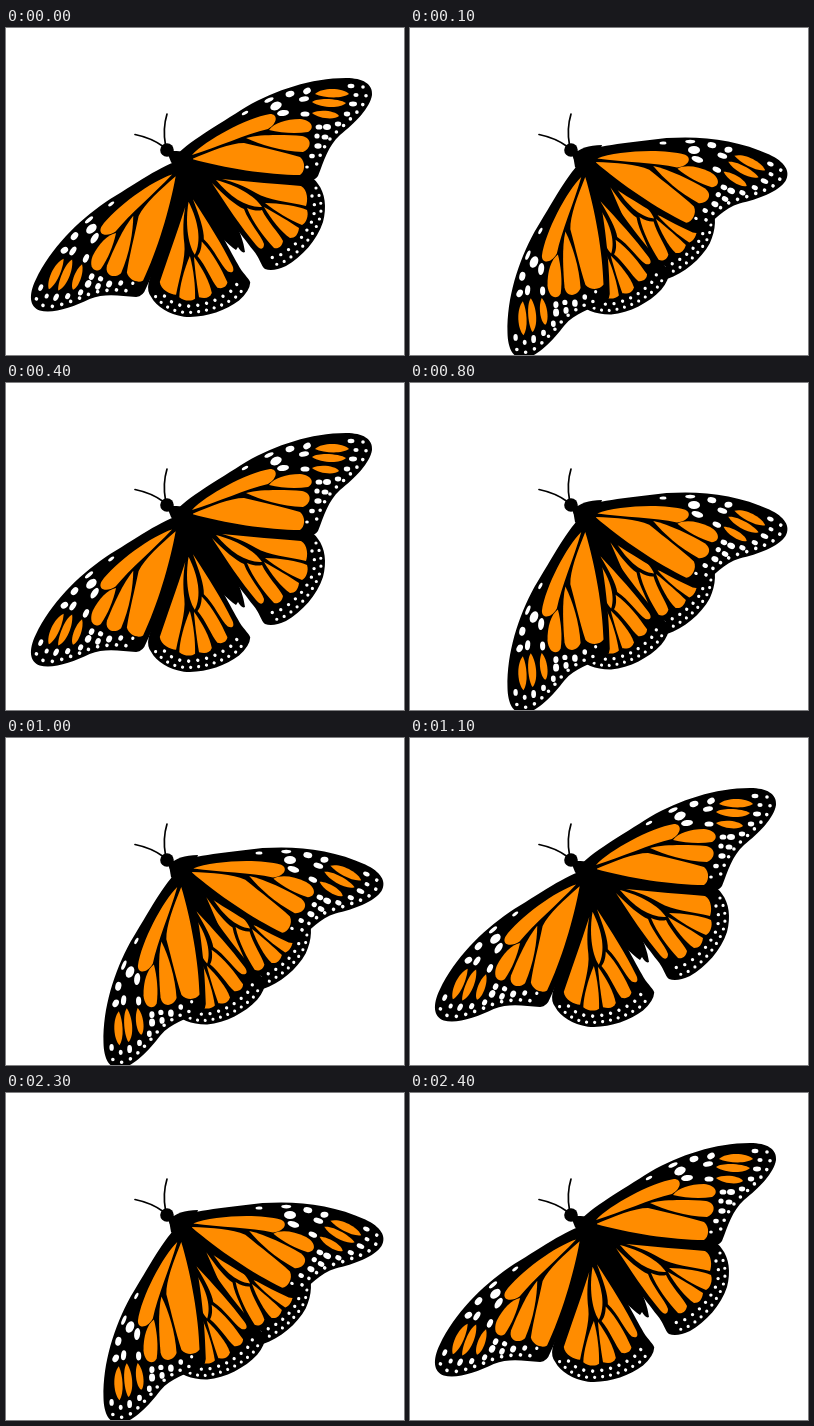
An HTML page that plays this animation: 398 by 327 pixels, repeating every 2.9 s.

```html
<!DOCTYPE html>
<html lang="en">
<head>
<meta charset="utf-8">
<title>Butterfly</title>
<style>
  html, body { margin: 0; width: 100%; height: 100%; overflow: hidden; background: #fff; }
  svg { display: block; width: 100vw; height: 100vh; }
  .cell { fill: #ff8c00; }
  .spot { fill: #fff; }
  .dots { fill: none; stroke: #fff; stroke-linecap: round; }
  .feeler { fill: none; stroke: #000; stroke-width: 1.7; stroke-linecap: round; }

  .pose { opacity: 0; animation: 2900ms step-end infinite; }
  .open { animation-name: open; }
  .half { animation-name: half; }
  .shut { animation-name: shut; }

  /* open, half, shut, half, open (rest), half, shut, half, open, half, shut (rest), half, open */
  @keyframes open {
    0%, 13.793%, 37.931%, 82.758%, 100% { opacity: 1; }
    3.448%, 27.586%, 41.379% { opacity: 0; }
  }
  @keyframes half {
    0%, 6.896%, 13.793%, 31.034%, 37.931%, 44.827%, 82.758%, 100% { opacity: 0; }
    3.448%, 10.344%, 27.586%, 34.482%, 41.379%, 79.31% { opacity: 1; }
  }
  @keyframes shut {
    0%, 10.344%, 34.482%, 79.31%, 100% { opacity: 0; }
    6.896%, 31.034%, 44.827% { opacity: 1; }
  }
</style>
</head>
<body>
<svg viewBox="0 0 398 327" preserveAspectRatio="none">
  <defs>
    <!-- wings: root at the origin, tip of the forewing along +x -->
    <g id="fore" transform="rotate(20.7) translate(-174 -130)">
      <path d="M169 129 C180 115 212 97 240 79 C270 62 305 50 340 50 C357 50 367 56 366 67 C364 80 349 95 334 107 C322 118 318 133 312 148 Q308 154 300 153 C260 153 220 148 196 143 L174 138 Z"/>
      <g class="cell">
        <path d="M186 127 C200 112 240 90 264 86 C272 86 272 95 262 101 C240 106 212 119 186 127 Z"/>
        <path d="M263 102 C268 95 280 91 294 91 C306 92 309 100 302 104 C290 106 275 105 263 102 Z"/>
        <path d="M240 110 C256 106 280 107 296 108 C307 110 305 121 297 124 C275 123 255 117 240 110 Z"/>
        <path d="M186 131 C205 123 224 115 238 115 C258 120 278 124 294 129 C300 134 299 144 294 147 C262 147 218 140 186 131 Z"/>
        <path d="M309 66 C317 59 337 60 343 66 C336 71 318 70 309 66 Z"/>
        <path d="M306 74 C313 69 334 71 340 75 C334 81 315 80 306 74 Z"/>
        <path d="M306 85 C314 81 330 83 333 88 C329 92 313 91 306 85 Z"/>
      </g>
      <g class="spot">
        <ellipse cx="239" cy="85" rx="3.5" ry="1.5" transform="rotate(-28 239 85)"/>
        <ellipse cx="263" cy="72" rx="5" ry="1.8" transform="rotate(-25 263 72)"/>
        <ellipse cx="270" cy="78" rx="6" ry="4" transform="rotate(-24 270 78)"/>
        <ellipse cx="277" cy="85" rx="6" ry="3" transform="rotate(-8 277 85)"/>
        <ellipse cx="284" cy="66" rx="4.5" ry="3" transform="rotate(-15 284 66)"/>
        <ellipse cx="301" cy="63" rx="4" ry="3" transform="rotate(-30 301 63)"/>
        <ellipse cx="298" cy="71" rx="5" ry="2.6" transform="rotate(-8 298 71)"/>
        <ellipse cx="299" cy="86" rx="4.5" ry="2.6"/>
        <ellipse cx="313" cy="99" rx="3.4" ry="2.6"/>
        <ellipse cx="321" cy="99" rx="4" ry="3"/>
        <ellipse cx="311" cy="108" rx="2.6" ry="2.6"/>
        <ellipse cx="319" cy="109" rx="3.4" ry="2.6"/>
        <ellipse cx="312" cy="118" rx="3.6" ry="2.8"/>
        <ellipse cx="306" cy="128" rx="2.8" ry="2.3"/>
        <ellipse cx="301" cy="139" rx="1.8" ry="1.6"/>
        <ellipse cx="345" cy="58" rx="3.4" ry="2.2"/>
        <ellipse cx="350" cy="67" rx="2.6" ry="2"/>
        <ellipse cx="347" cy="76" rx="4" ry="2.4"/>
        <ellipse cx="341" cy="86" rx="3.2" ry="2.4"/>
        <ellipse cx="332" cy="96" rx="3.2" ry="2.4"/>
      </g>
      <path class="dots" stroke-width="3.6" stroke-dasharray="0 9.5" d="M357 59 Q365 68 352 83 Q341 95 328 106 Q314 122 309 142"/>
    </g>

    <g id="hind" transform="rotate(20.7) translate(-174 -130)">
      <path d="M174 130 L200 138 L300 148 Q309 150 312 156 C319 165 321 179 317 194 C311 212 296 229 280 238 Q267 244 259 241 C255 238 254 230 247 222 C236 208 215 178 190 156 Z"/>
      <g class="cell">
        <path d="M210 152 C230 157 249 168 256 179 C241 180 224 169 210 152 Z"/>
        <path d="M216 151 C244 154 274 156 295 158 C302 162 302 173 300 178 C283 174 262 172 250 165 C238 158 228 154 216 151 Z"/>
        <path d="M259 175 C273 175 292 178 301 182 C303 188 300 195 296 197 C284 192 270 184 259 175 Z"/>
        <path d="M258 179 C271 186 284 194 293 200 C292 207 289 210 284 210 C275 204 265 191 258 179 Z"/>
        <path d="M241 180 C248 183 253 183 256 182 C261 193 273 205 277 213 C276 219 272 221 268 220 C258 209 247 195 241 180 Z"/>
        <path d="M206 155 C218 167 230 178 238 181 C243 195 255 207 258 216 C258 222 254 222 250 217 C235 199 221 178 206 155 Z"/>
      </g>
      <path class="dots" stroke-width="3.2" stroke-dasharray="0 8" d="M310 160 Q319 178 312 195 Q301 219 279 233 Q270 238 264 236"/>
      <path class="dots" stroke-width="3.4" stroke-dasharray="0 9" d="M306 168 Q312 182 304 197 Q294 215 276 226 Q267 231 260 229"/>
    </g>

    <path id="abdomen" d="M168 130 C184 130 200 142 207 154 C220 175 237 204 239 224 Q236 226 232 219 L230 222 C222 217 210 204 197 188 C184 172 172 152 168 130 Z"/>
    <g id="head">
      <path d="M161 124 C166 122 181 123 187 128 Q188 139 176 141 Q166 140 163 129 Z"/>
      <circle cx="161" cy="122" r="6.8"/>
      <path class="feeler" d="M158 119 Q146 110 129 106.500"/>
      <path class="feeler" d="M159.500 117 Q156.500 101 161 86"/>
    </g>
  </defs>

  <g class="pose open">
    <use href="#abdomen"/>
    <g transform="translate(174 130) rotate(-20.7)">
      <use href="#hind"/>
      <use href="#fore"/>
    </g>
    <use href="#hind" transform="translate(177 132) rotate(134.5) scale(1 -1)"/>
    <use href="#fore" transform="translate(174 137) rotate(136.5) scale(1 -1)"/>
    <use href="#head"/>
  </g>

  <g class="pose half">
    <use href="#abdomen"/>
    <use href="#hind" transform="translate(174 130) rotate(-10.7) scale(.97)"/>
    <use href="#fore" transform="translate(175 128) rotate(4.6)"/>
    <g transform="translate(174 137) rotate(109.5) scale(1 -1)">
      <use href="#hind" transform="rotate(-15) scale(.97)"/>
      <use href="#fore"/>
    </g>
    <path d="M163 127 Q172 117 192 117 L186 134 L172 146 L165 139 Z"/>
    <use href="#head"/>
  </g>

  <g class="pose shut">
    <g transform="translate(174 130) rotate(40.4)">
      <use href="#hind" transform="scale(1 .22) rotate(-24)"/>
      <use href="#fore" transform="scale(1 .25)"/>
    </g>
    <g transform="translate(174 130) rotate(66) scale(.98 -1)">
      <use href="#hind" transform="scale(1 .22) rotate(-24)"/>
      <use href="#fore" transform="scale(1 .25)"/>
    </g>
    <path d="M162 124 L172 126 L187 137 L196 156 L182 146 L168 138 Z"/>
    <use href="#head" clip-path="polygon(0 0, 172px 0, 172px 145px, 0 145px)"/>
  </g>
</svg>
</body>
</html>
```
